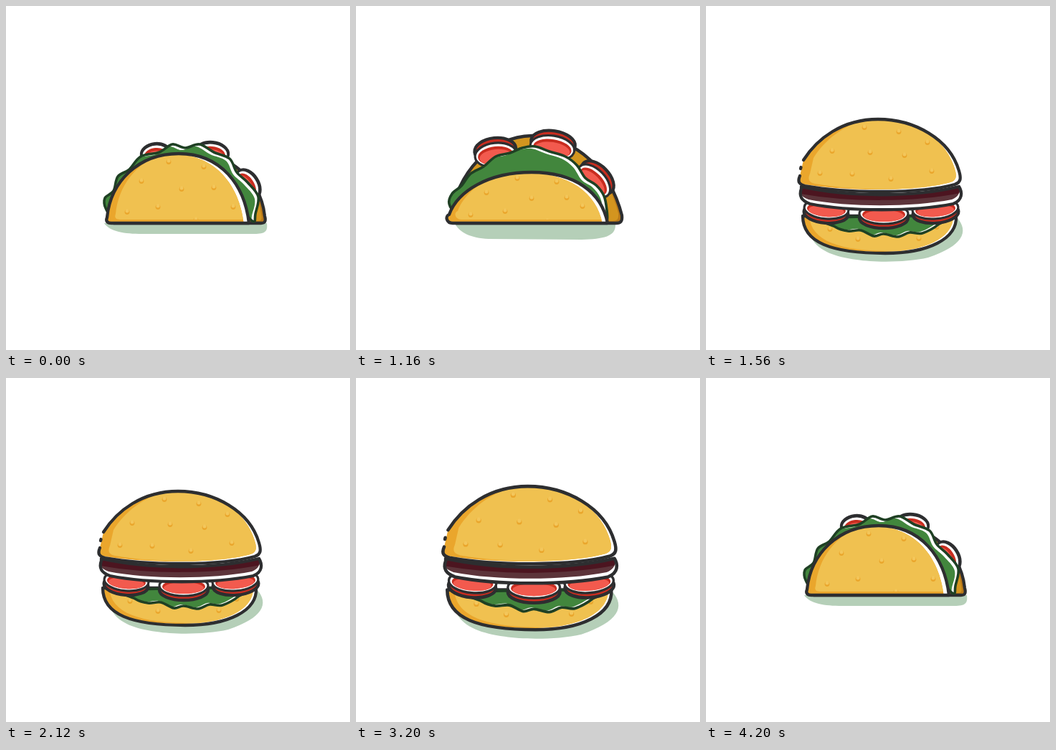
These frames come from a looping animation (480 by 480 pixels, 4640 ms). An HTML page with a canvas:

```html
<!DOCTYPE html>
<html lang="en">
<head>
<meta charset="utf-8">
<title>Taco and burger</title>
<style>
  html, body { margin: 0; width: 100%; height: 100%; overflow: hidden; background: #fff; }
  canvas { display: block; width: 100vw; height: 100vh; }
</style>
</head>
<body>
<canvas id="stage" width="480" height="480"></canvas>
<script>
const ctx = document.getElementById('stage').getContext('2d');
const LOOP = 4640, STEP = 40;
const INK = '#2d2e30', GOLD = '#f0c150', ORANGE = '#eaa62c', BACK = '#d3951f',
      GREEN = '#42863d', LEAF_INK = '#1f4024', RED = '#c92d20', PULP = '#f25a4e',
      SHADE = '#b5cfb8';

// Taco poses: closed, leaning, opened wide.
const shadow = [
  'M137 303 L364 303 C366 318 358 318 340 318 L190 318 C165 318 145 315 137 303Z',
  'M138 304 L362 304 C363 322 345 325 315 326 L185 325 C160 324 145 316 138 304Z',
  'M138 297 L358 297 C364 325 335 344 270 345 L230 345 C170 344 135 325 138 297Z'
];
const back = [
  'M145 300 C145 245 190 200 245 200 C300 200 355 235 361 293 C363 301 361 303 356 303 L150 303Z',
  'M132 300 C140 230 190 182 245 181 C310 184 355 230 371 292 C372 301 369 303 363 303 L140 303Z',
  'M137 295 C125 270 165 187 240 187 C295 187 345 225 352 285 C352 295 352 296 348 298 L145 298Z'
];
const front = [
  'M141 295 C146 245 185 206 241 206 C300 206 333 250 339 303 C300 303 190 303 147 303 C141 303 139 300 141 295Z',
  'M130 291 C142 258 185 232 245 232 C305 232 343 260 351 303 C300 303 190 303 135 303 C126 303 124 293 130 291Z',
  'M141 295 C148 262 190 248 245 248 C305 248 343 260 349 295 C348 322 190 321 160 312 C148 308 141 301 141 295Z'
];
const frontSeeds = [
  '227 217 189 244 276 224 245 255 290 253 169 287 212 280 317 280 265 298',
  '225 240 182 260 280 245 245 268 294 267 160 291 208 286 316 279 267 300',
  '248 257 196 268 297 262 233 302 273 281 160 330 212 330 317 293 267 330'
];
const leafTop = [
  '139 282 138 268 150 258 156 238 172 228 188 210 214 204 232 193 250 198 270 193 290 204 312 213 322 232 337 246 352 266 348 290',
  '130 276 134 262 147 251 160 234 178 224 195 210 215 205 232 198 250 196 270 203 292 210 308 222 320 240 335 250 346 265 350 285',
  '143 290 145 278 152 262 162 248 172 238 185 230 208 222 235 216 262 215 285 220 305 228 322 240 335 255 345 262 353 278 350 292'
];
const leafBottom = [
  '346 301 335 290 325 265 300 235 280 222 255 215 230 215 200 222 170 245 150 290',
  '350 300 340 290 320 270 300 255 280 245 255 240 230 240 200 246 165 262 140 285',
  '350 292 340 280 325 270 302 265 288 249 262 250 238 243 212 249 180 256 152 278'
];
// Each slice: x, y, radii, tilt, thickness.
const slices = [
  ['209 207 20 14 -.1 1', '195 208 29 17 -.1 7', '200 222 31 12 -.15 8'],
  ['287 206 23 15 .1 1', '274 198 31 17 .15 7', '274 216 32 12 .18 8'],
  ['337 249 22 14 1 1', '332 244 28 16 .8 7', '342 256 28 13 .65 7']
];

const bottomBun = 'M135 293 C135 330 175 345 250 345 C310 345 351 325 349 293Z';
const topBun = 'M131 237 C127 246 131 249 138 251 C200 262 300 262 347 249 C356 246 356 240 353 230 C340 185 290 158 240 158 C190 158 155 185 136 215';
const patty = 'M133 255 C129 266 134 272 145 276 C200 287 290 287 345 276 C358 271 358 260 353 252 C290 267 200 267 133 252Z';
const bunShadow = 'M148 325 L350 295 C368 315 358 335 310 351 C280 358 235 358 210 354 C180 350 158 342 148 325Z';
const burgerLeaf = '170 296 180 308 198 314 216 313 234 321 248 318 268 322 284 316 302 317 324 305 328 294';

// Time, value pairs.
const poseTrack = [840, 0, 1000, .35, 1160, 1, 1280, 2, 3280, 2, 3400, 2, 3520, 1, 3680, .2, 3800, 0];
const sizeTrack = [1160, 1, 1270, 1.08, 1280, .92, 1400, 1.07, 1480, 1.01, 1560, 1,
                   3120, 1, 3200, 1.07, 3270, .95, 3280, 1.06, 3400, 1];

const nums = s => s.match(/-?[\d.]+/g).map(Number);

function mix(keys, p) {
  const i = Math.min(Math.floor(p), keys.length - 2), next = nums(keys[i + 1]);
  let n = 0;
  return keys[i].replace(/-?[\d.]+/g, a => (+a + (next[n++] - a) * (p - i)).toFixed(3));
}

function track(list, t) {
  let i = 0;
  if (t <= list[0]) return list[1];
  while (i + 2 < list.length && list[i + 2] <= t) i += 2;
  if (i + 2 >= list.length) return list[i + 1];
  return list[i + 1] + (list[i + 3] - list[i + 1]) * (t - list[i]) / (list[i + 2] - list[i]);
}

function smooth(text) {
  const v = nums(text), n = v.length / 2, path = new Path2D();
  const at = i => { i = (i + n) % n; return [v[2 * i], v[2 * i + 1]]; };
  path.moveTo(...at(0));
  for (let i = 0; i < n; i++) {
    const [a, b, c, d] = [at(i - 1), at(i), at(i + 1), at(i + 2)];
    path.bezierCurveTo(b[0] + (c[0] - a[0]) / 6, b[1] + (c[1] - a[1]) / 6,
                       c[0] - (d[0] - b[0]) / 6, c[1] - (d[1] - b[1]) / 6, ...c);
  }
  path.closePath();
  return path;
}

function fill(path, color) {
  ctx.fillStyle = color;
  ctx.fill(path);
}

function line(path, color = INK, width = 4.3) {
  ctx.strokeStyle = color;
  ctx.lineWidth = width;
  ctx.stroke(path);
}

// Fills a shape, then nests shifted copies of it as [color, dx, dy].
function layered(path, base, layers, inside) {
  ctx.save();
  fill(path, base);
  ctx.clip(path);
  for (const [color, dx, dy] of layers) {
    ctx.translate(dx, dy);
    fill(path, color);
    ctx.clip(path);
    ctx.translate(-dx, -dy);
  }
  if (inside) inside();
  ctx.restore();
}

function seeds(text) {
  const v = nums(text);
  for (let i = 0; i < v.length; i += 2) {
    for (const [dy, r, color] of [[.5, 3.4, ORANGE], [-1, 2.5, '#f3c65b']]) {
      ctx.fillStyle = color;
      ctx.beginPath();
      ctx.arc(v[i], v[i + 1] + dy, r, 0, 7);
      ctx.fill();
    }
  }
}

function tomato(text, face = PULP) {
  const [x, y, rx, ry, tilt, depth] = nums(text);
  const oval = (dx, dy, inset = 0) => {
    const path = new Path2D();
    path.ellipse(dx, dy, rx - inset, ry - inset, 0, 0, 7);
    return path;
  };
  ctx.save();
  ctx.translate(x, y);
  ctx.rotate(tilt);
  const rim = oval(0, -depth), top = oval(0, 0);
  fill(rim, RED);
  line(rim);
  fill(top, '#fff');
  fill(oval(0, 1, 4), RED);
  fill(oval(0, 3, 6), face);
  line(top, INK, 3.2);
  ctx.restore();
}

function drawTaco(p) {
  const leaf = smooth(mix(leafTop, p) + ' ' + mix(leafBottom, p));
  const shell = new Path2D(mix(front, p)), rear = new Path2D(mix(back, p));
  const open = p > 1.5;
  const drawLeaf = () => {
    layered(leaf, '#fff', [[GREEN, -5, 3]]);
    line(leaf, LEAF_INK, 3.6);
  };
  const drawShell = () => {
    layered(shell, '#fff', [[ORANGE, -7, 1], [GOLD, 12, -5]], () => seeds(mix(frontSeeds, p)));
    line(shell);
  };
  fill(new Path2D(mix(shadow, p)), SHADE);
  layered(rear, '#b9791a', [[BACK, -5, -3]]);
  line(rear);
  slices.forEach(s => tomato(mix(s, p), open ? RED : PULP));
  for (const part of open ? [drawShell, drawLeaf] : [drawLeaf, drawShell]) part();
}

function drawBurger() {
  const base = new Path2D(bottomBun), bun = new Path2D(topBun), meat = new Path2D(patty);
  const leaf = smooth(burgerLeaf);
  fill(new Path2D(bunShadow), SHADE);
  layered(base, '#fff', [[ORANGE, -4, -2], [GOLD, 9, -3]],
    () => seeds('173 311 212 325 297 324 322 308'));
  line(base);
  layered(leaf, '#fff', [[GREEN, -3, -2]]);
  line(leaf, LEAF_INK, 3.6);
  ['168 283 31 14 .08 -6', '320 283 32 14 -.08 -6', '248 290 34 14 0 -6'].forEach(s => tomato(s));
  layered(meat, '#fff', [['#5c343a', -2, -6]],
    () => line(new Path2D('M132 258 C200 270 290 270 354 257'), '#4c1520', 8));
  line(meat);
  layered(bun, '#fff', [[ORANGE, -6, -3], [GOLD, 14, -3]],
    () => seeds('221 169 269 175 309 190 176 202 229 204 277 208 159 233 204 234 258 241 315 230'));
  line(bun);
  line(new Path2D('M132.5 225 L132 227'));
}

function draw(t) {
  const size = track(sizeTrack, t);
  ctx.setTransform(1, 0, 0, 1, 0, 0);
  ctx.fillStyle = '#fff';
  ctx.fillRect(0, 0, 480, 480);
  ctx.lineCap = ctx.lineJoin = 'round';
  ctx.translate(245, 256);
  ctx.scale(size, size);
  ctx.translate(-245, -256);
  if (t >= 1280 && t < 3280) drawBurger();
  else drawTaco(track(poseTrack, t));
}

const start = performance.now();
function tick() {
  const t = (performance.now() - start) % LOOP;
  draw(Math.floor(t / STEP) * STEP);
  requestAnimationFrame(tick);
}
tick();
</script>
</body>
</html>
```
